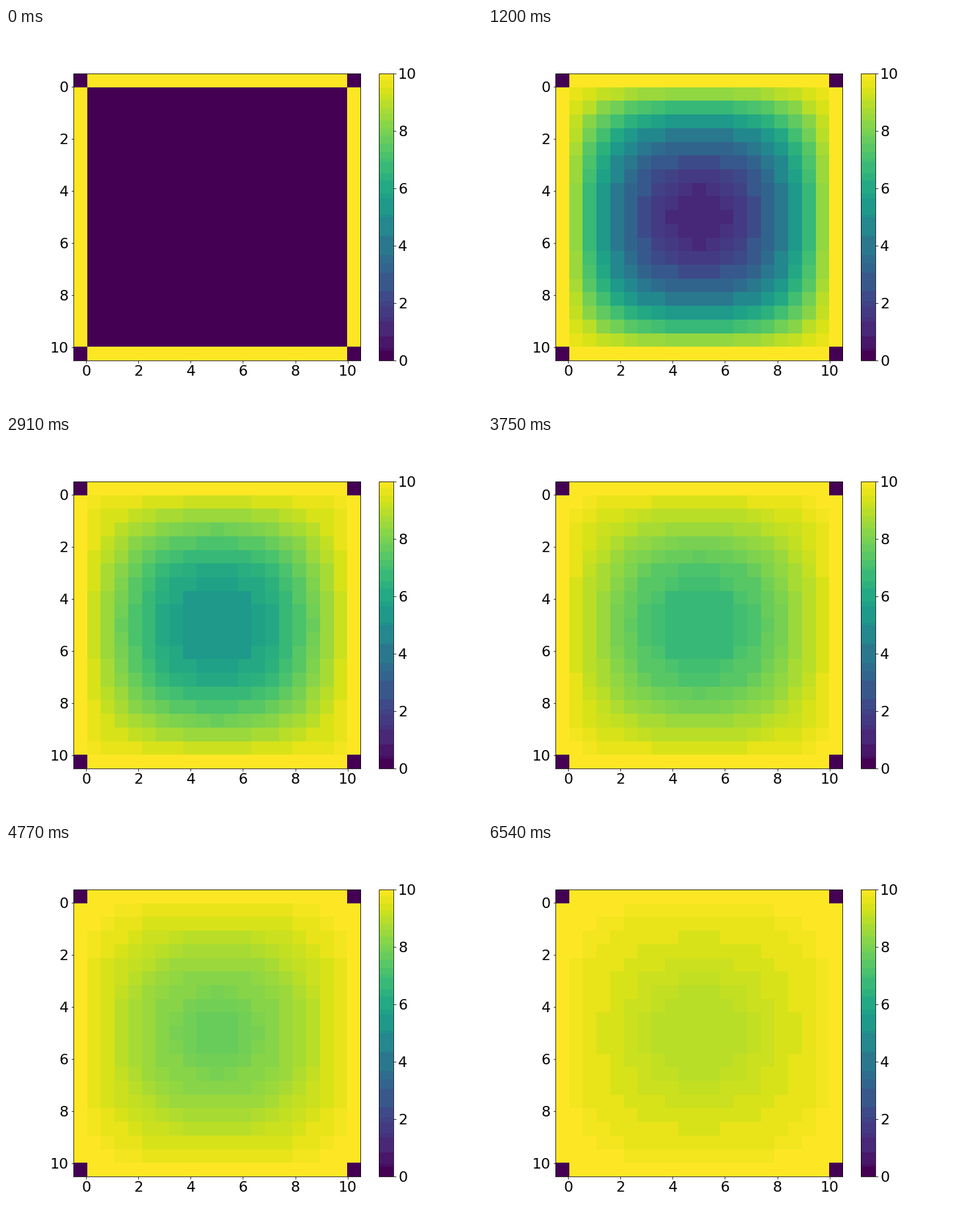
A matplotlib script that plays this animation: 720 by 576 pixels, repeating every 6.6 s.

```python
import matplotlib.pyplot as plt
import numpy as np
from matplotlib.animation import FuncAnimation
from matplotlib.colors import ListedColormap

FRAMES, INTERVAL = 220, 30
SIZE = 21
HOT = 10.0

plt.rcParams.update({
    "font.family": "DejaVu Sans",
    "font.size": 22,
    "figure.subplot.bottom": 0.125,
})


def banded_viridis():
    """Viridis merged into flat bands, 16 levels per channel."""
    rgb = plt.get_cmap("viridis")(np.arange(256))[:, :3]
    level = np.floor(rgb * 255 / 16)
    starts = np.flatnonzero(np.any(np.diff(level, axis=0) != 0, axis=1)) + 1
    runs = np.split(np.arange(256), starts)
    out = rgb.copy()
    for run in runs:
        out[run] = rgb[run].mean(axis=0)
    # The end bands keep the pure end colours.
    out[runs[0]] = rgb[0]
    out[runs[-1]] = rgb[-1]
    return ListedColormap(out)


def heat_states():
    """Plate with hot edges: each step averages the four neighbours."""
    u = np.zeros((SIZE, SIZE))
    u[0, 1:-1] = u[-1, 1:-1] = HOT
    u[1:-1, 0] = u[1:-1, -1] = HOT
    states = [u]
    for _ in range(FRAMES - 1):
        nxt = u.copy()
        nxt[1:-1, 1:-1] = (u[:-2, 1:-1] + u[2:, 1:-1]
                           + u[1:-1, :-2] + u[1:-1, 2:]) / 4
        u = nxt
        states.append(u)
    return states


states = heat_states()
fig, ax = plt.subplots(figsize=(10, 8), dpi=72)
image = ax.imshow(states[0], cmap=banded_viridis(), vmin=0, vmax=HOT,
                  extent=(-0.5, 10.5, 10.5, -0.5), interpolation="nearest")
ticks = range(0, 11, 2)
ax.set_xticks(ticks)
ax.set_yticks(ticks)
fig.colorbar(image, ax=ax, ticks=ticks)


def update(i):
    image.set_data(states[i])
    return (image,)


anim = FuncAnimation(fig, update, frames=FRAMES, interval=INTERVAL,
                     init_func=lambda: update(0), repeat=True,
                     repeat_delay=0, blit=False)
plt.show()
```
